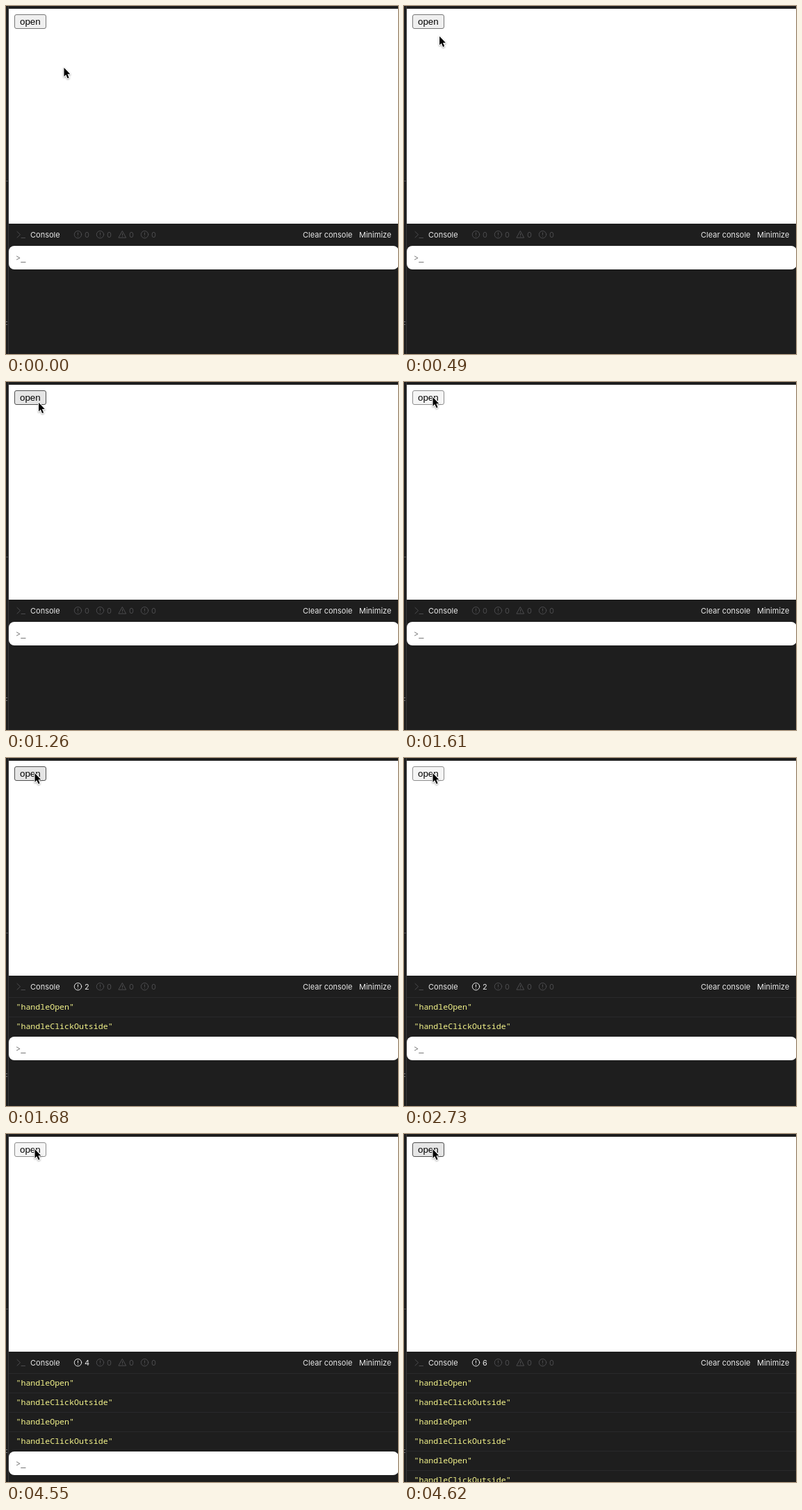
Recreate the animation shown at these times as an HTML page. Size 564 by 502 pixels, loop 6.02 s.

```html
<!DOCTYPE html>
<html lang="en">
<head>
<meta charset="utf-8">
<title>Console</title>
<style>
  html, body { margin: 0; width: 100%; height: 100%; overflow: hidden; background: #1e1e1e; }
  #stage { position: relative; width: 564px; height: 502px; overflow: hidden; background: #1e1e1e; }
  #stage > * { position: absolute; }
  #edge { left: 3px; top: 0; width: 1px; height: 502px; background: #38383a; }
  #page { left: 4px; top: 4px; width: 560px; height: 310px; background: #fff; }
  #open {
    left: 12px; top: 12px; box-sizing: border-box; width: 45.66px; height: 21px;
    border: 1px solid; border-radius: 3px; color: #000; text-align: center;
    font: 13.333px/19px "Liberation Sans", Arial, sans-serif;
  }
  .label { top: 322px; color: #e9e9e9; font: 11px/16px Inter, sans-serif; white-space: pre; }
  .dim { color: #4c4c4e; }
  #icons { left: 0; top: 314px; fill: none; stroke-width: 1; stroke-linecap: round; stroke-linejoin: round; }
  #icons g { color: #4c4c4e; stroke: currentColor; }
  .row {
    left: 4px; width: 560px; height: 27px; border-top: 1px solid #29292b;
    color: #f6f68c; font: 11.6px/26px "Noto Sans Mono", "DejaVu Sans Mono", monospace;
    text-indent: 10.5px; white-space: pre;
  }
  #prompt {
    left: 4px; width: 561px; height: 34px; border-radius: 8px; background: #fff; color: #757575;
    font: 12px/35px "Noto Sans Mono", "DejaVu Sans Mono", monospace; text-indent: 10px;
  }
  #cursor { left: 0; top: 0; overflow: visible; filter: drop-shadow(0 1px 1px rgba(0,0,0,.35)); }
</style>
</head>
<body>
<div id="stage">
  <div id="edge"></div>
  <svg width="4" height="502" fill="none" stroke="#515153">
    <path d="M0 252.5H3"/>
    <path d="M0 455.5H2M0 459.5H2" stroke="#77777a"/>
  </svg>
  <div id="page"></div>
  <div id="open">open</div>
  <svg id="icons" width="240" height="32">
    <g><path d="M16 11.5l4.5 4.3-4.5 4.3M22 20.5h5.5"/></g>
  </svg>
  <span class="label" style="left:35px">Console</span>
  <span class="label" style="left:427px">Clear console</span>
  <span class="label" style="left:508px">Minimize</span>
  <div id="prompt">&gt;_</div>
  <svg id="cursor" width="12" height="18">
    <path d="M0 0V12.7L2.8 10L5 15.3L7.1 14.4L4.9 9.3H8.8Z" stroke="#fff" stroke-width="2" stroke-linejoin="round" paint-order="stroke"/>
  </svg>
</div>
<script>
const LOOP = 6020, STEP = 70;
const stage = document.getElementById("stage");
const icons = document.getElementById("icons");
const button = document.getElementById("open");
const prompt = document.getElementById("prompt");
const cursor = document.getElementById("cursor");

const looks = {
  idle: ["#efefef", "#767676"],
  hover: ["#e5e5e5", "#4f4f4f"],
  down: ["#f5f5f5", "#8d8d8d"]
};

const clicks = [1610, 2730, 4550];

// start, steps, from, to
const moves = [
  [350, 5, [83.5, 89], [33.5, 19]],
  [980, 2, [33.5, 19], [50, 34]],
  [1190, 5, [50, 34], [41.5, 22]]
];

function addCounter(x, triangle) {
  const cx = x + 5.5;
  const shape = triangle
    ? `<path d="M${cx} 10.8l5.2 9.4h-10.4z"/><path d="M${cx} 14.2v2.6M${cx} 18.5v.1"/>`
    : `<circle cx="${cx}" cy="15.7" r="5.2"/><path d="M${cx} 13v3M${cx} 18.2v.1"/>`;
  icons.insertAdjacentHTML("beforeend", `<g>${shape}</g>`);
  const count = document.createElement("span");
  count.className = "label dim";
  count.style.left = x + 15 + "px";
  count.textContent = "0";
  stage.insertBefore(count, prompt);
  return { icon: icons.lastElementChild, count };
}

const logs = [0, 1, 2, 3].map(i => addCounter(98 + 32 * i, i === 2))[0];

const rows = Array.from({ length: 6 }, (_, i) => {
  const row = document.createElement("div");
  row.className = "row";
  row.style.top = 345 + 28 * i + "px";
  row.textContent = i % 2 ? '"handleClickOutside"' : '"handleOpen"';
  stage.insertBefore(row, prompt);
  return row;
});

const ease = p => p * p * (3 - 2 * p);

function cursorAt(t) {
  let pos = moves[0][2];
  for (const [start, steps, from, to] of moves) {
    if (t < start) break;
    const n = Math.min(steps, Math.floor((t - start) / STEP) + 1);
    const k = ease(n / steps);
    pos = from.map((v, i) => v + (to[i] - v) * k);
  }
  return pos;
}

function buttonState(t) {
  if (clicks.some(c => t >= c && t < c + STEP)) return "down";
  return t >= 910 && t < 1050 || t >= 1260 ? "hover" : "idle";
}

function draw(t) {
  const [x, y] = cursorAt(t);
  cursor.style.transform = `translate(${x}px, ${y}px)`;

  const [fill, line] = looks[buttonState(t)];
  button.style.background = fill;
  button.style.borderColor = line;

  const lines = 2 * clicks.filter(c => t >= c + STEP).length;
  rows.forEach((row, i) => { row.style.display = i < lines ? "block" : "none"; });
  prompt.style.top = 346 + 28 * lines + "px";
  const color = lines ? "#e9e9e9" : "#4c4c4e";
  logs.count.textContent = lines;
  logs.count.style.color = logs.icon.style.color = color;
}

const begin = performance.now();
function tick() {
  draw((performance.now() - begin) % LOOP);
  requestAnimationFrame(tick);
}
tick();
</script>
</body>
</html>
```
